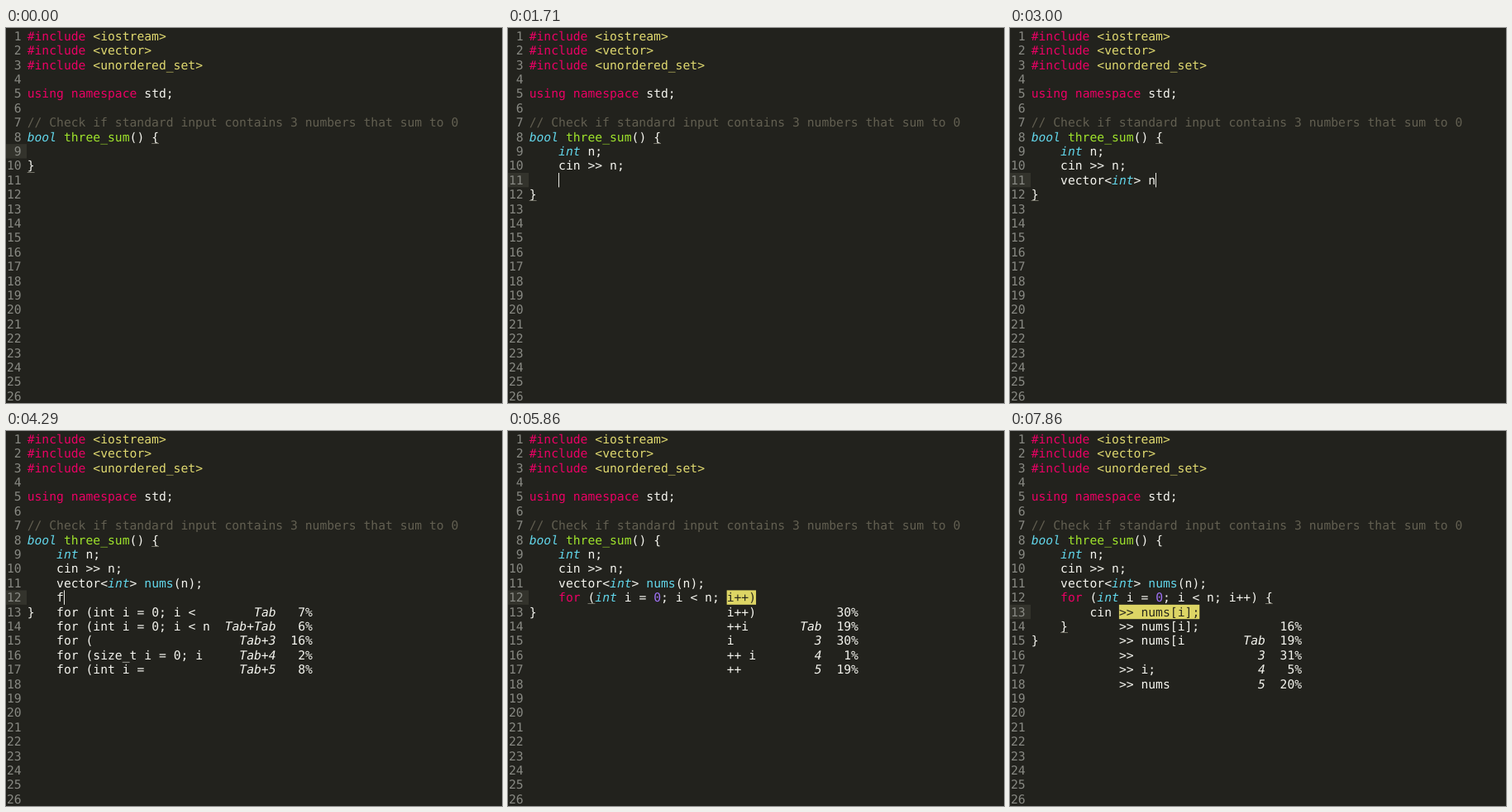
An HTML page for the animation above (8000 ms loop, 600 px wide and 453 px high).

```html
<!DOCTYPE html>
<html lang="en">
<head>
<meta charset="utf-8">
<title>Code completion</title>
<style>
  html, body { margin: 0; width: 100%; height: 100%; overflow: hidden; background: #22221d; }
  svg { display: block; width: 100%; height: 100%; }
  text { font: 14.7px "DejaVu Sans Mono", monospace; white-space: pre; text-rendering: geometricPrecision; fill: #f4f4ee; }
  .num { fill: #888983; }
  .pink { fill: #ea0064; }
  .yellow { fill: #e0d970; }
  .type { fill: #62d6ea; font-style: italic; }
  .call { fill: #62d6ea; }
  .def { fill: #9fe32c; }
  .digit { fill: #9f72f5; }
  .comment { fill: #625f51; }
  .dark { fill: #2b2a1e; }
  .key { font-style: italic; }
</style>
</head>
<body>
<svg viewBox="0 0 600 453"></svg>
<script>
const LOOP = 8000, CELL = 8.85, ROW = 17.4, LEFT = 25.7, TOP = 1, BASE = 13.8;
const svg = document.querySelector('svg');
const colX = col => LEFT + col * CELL;
const rowY = line => TOP + (line - 1) * ROW;

const HEADER = `#include <iostream>
#include <vector>
#include <unordered_set>

using namespace std;

// Check if standard input contains 3 numbers that sum to 0
bool three_sum() {`.split('\n');

const TOKENS = [
  ['comment', /\/\/.*/y],
  ['pink', /#include|\b(?:using|namespace|for)\b/y],
  ['yellow', /(?<=#include )<\w+>/y],
  ['type', /\b(?:int|bool)\b/y],
  ['def', /three_sum/y],
  ['call', /nums(?=\()/y],
  ['digit', /\b\d+/y],
  ['', /\w+|[^\w\s]+?/y]
];

// Completion lists: 'text:percent'
const VEC_LONG = ['vector<int>:24', 'vector<string> names;:4', 'vector<:21', 'vector<unsigned int>:3', 'vector<int> n:9'];
const VEC = ['vector<int>:31', 'vector<string>:5', 'vector<:18', 'vector<unsigned int>:3', 'vector<unsigned:4'];
const FOR = ['for (int i = 0; i <:7', 'for (int i = 0; i < n:6', 'for (:16', 'for (size_t i = 0; i:2', 'for (int i =:8'];
const FOR_LONG = ['for (int i = 0; i < n;:9', 'for (int i = 0; i <:8', 'for (:17', 'for (size_t i = 0; i:2', 'for (int i =:9'];
const STEP = ['i++):30', '++i:19', 'i:30', '++ i:1', '++:19'];
const OPEN = [' {:42', ' cin:9', ' nums:3', ' cin :8', ' if:2'];
const OPEN_NEXT = ['{:45', 'cin:10', 'cin >:9', 'nums:3', 'if:2'];
const CIN = ['cin >> nums[i];:15', 'cin >> nums[i:18', 'cin >>:30', 'cin >> i;:5', 'cin >> nums:20'];
const READ = ['>> nums[i];:16', '>> nums[i:19', '>>:31', '>> i;:5', '>> nums:20'];

const TAB = '    ';
const B1 = TAB + 'int n;\n';
const B2 = B1 + TAB + 'cin >> n;\n';
const B3 = B2 + TAB + 'vector<int> nums(n);\n';
const B4 = B3 + TAB + 'for (int i = 0; i < n; i++) {\n';
const END = '\n' + TAB + '}';

// Bracket underlines as [line, column]
const OUTER = [8, 17];
const whole = line => [OUTER, [line, 0]];
const PAREN = [[12, 8]];
const BLOCK = [[12, 32], [14, 4]];

// [time, body, marks, list, list column]; | caret, ¦ hidden caret, «» inserted completion
const steps = [[0, TAB + '¦', whole(10)]];
const type = (before, after, marks, items) => {
  for (const [time, text, list, col] of items) steps.push([time, before + TAB + text + after, marks, list, col]);
};
type('', '', whole(10), [[140, 'i|'], [290, 'in|'], [430, 'int|'], [570, 'int n|'], [710, 'int n;|']]);
type(B1, '', whole(11), [[860, '|'], [1000, 'c|'], [1140, 'cin|'], [1290, 'cin >>|'], [1430, 'cin >> |'], [1570, 'cin >> n;|']]);
type(B2, '', whole(12), [
  [1710, '|'], [1860, 'v|', VEC_LONG, 4], [2000, 've|', VEC_LONG, 4], [2140, 'vec|', VEC_LONG, 4],
  [2430, 'vect|', VEC, 4], [2570, '«vector<int>»', VEC, 4], [2710, 'vector<int>|'], [2860, 'vector<int> |'],
  [3000, 'vector<int> n|'], [3140, 'vector<int> nu|'], [3290, 'vector<int> nums|'],
  [3430, 'vector<int> nums(n|'], [3570, 'vector<int> nums(n)|'], [3710, 'vector<int> nums(n);|']
]);
type(B3, '', whole(13), [[3860, '|']]);
type(B3, '', [OUTER], [[4290, 'f|', FOR, 4], [4570, 'fo|', FOR_LONG, 4], [4710, 'for|', FOR_LONG, 4]]);
type(B3, '', PAREN, [
  [5000, '«for (int i = 0; i < n;»', FOR_LONG, 4], [5290, 'for (int i = 0; i < n;|'],
  [5570, 'for (int i = 0; i < n; |', STEP, 27], [5860, 'for (int i = 0; i < n; «i++)»', STEP, 27]
]);
type(B3, '', [OUTER], [
  [6000, 'for (int i = 0; i < n; i++)|', OPEN, 31], [6140, 'for (int i = 0; i < n; i++) |', OPEN_NEXT, 32],
  [6290, 'for (int i = 0; i < n; i++) {|}']
]);
type(B4 + TAB, END, BLOCK, [
  [6430, '|'], [6860, '¦'], [7000, 'c|', CIN, 8], [7140, 'cin|', CIN, 8],
  [7290, 'cin |', READ, 12], [7710, 'cin «>> nums[i];»', READ, 12]
]);

function add(tag, attrs, content = '') {
  const node = document.createElementNS('http://www.w3.org/2000/svg', tag);
  for (const name in attrs) node.setAttribute(name, attrs[name]);
  node.textContent = content;
  svg.append(node);
}
const box = (x, y, width, height, fill) => add('rect', { x, y, width, height, fill });
const put = (line, x, content, cls = '') => add('text', { x, y: rowY(line) + BASE, class: cls }, content);

function drawCode(line, source, from, to) {
  for (let at = 0; at < source.length;) {
    let size = 1;
    for (const [cls, pattern] of TOKENS) {
      pattern.lastIndex = at;
      const match = pattern.exec(source);
      if (!match) continue;
      size = match[0].length;
      put(line, colX(at), match[0], at >= from && at < to ? 'dark' : cls);
      break;
    }
    at += size;
  }
}

function drawList(line, col, list, held) {
  const rows = list.map(entry => entry.split(':'));
  const keys = held ? ['', 'Tab', '3', '4', '5'] : ['Tab', 'Tab+Tab', 'Tab+3', 'Tab+4', 'Tab+5'];
  const keyEnd = col + Math.max(...rows.map(row => row[0].length)) + 9;
  rows.forEach(([label, share], i) => {
    const y = line + 1 + i, percent = share + '%';
    for (const word of label.matchAll(/\S+/g)) put(y, colX(col + word.index), word[0]);
    put(y, colX(keyEnd - keys[i].length), keys[i], 'key');
    put(y, colX(keyEnd + 5 - percent.length), percent);
  });
}

function draw([, body, marks, list, col]) {
  svg.replaceChildren();
  const lines = [...HEADER, ...body.split('\n'), '}'];
  const active = lines.findIndex(text => /[|¦«]/.test(text)) + 1;
  const top = rowY(active);
  box(0, top, 25, ROW, '#33332c');
  for (let n = 1; n <= 26; n++) put(n, 1 + (n < 10 ? CELL : 0), String(n), 'num');

  lines.forEach((raw, i) => {
    const caret = raw.indexOf('|'), from = raw.indexOf('«');
    const to = from < 0 ? -1 : raw.indexOf('»') - 1;
    if (from >= 0) box(colX(from), top, (to - from) * CELL, ROW, '#ddd565');
    drawCode(i + 1, raw.replace(/[|¦«»]/g, ''), from, to);
    if (caret >= 0) box(Math.round(colX(caret)), top, 1, ROW, '#e8e8e2');
  });
  for (const [line, at] of marks) box(colX(at), Math.round(rowY(line) + 16), CELL, 1, '#77766a');
  if (list) drawList(active, col, list, body.includes('«'));
}

let shown;
const start = performance.now();
function tick() {
  const time = (performance.now() - start) % LOOP;
  const step = steps.findLast(item => item[0] <= time);
  if (step !== shown) draw(shown = step);
  requestAnimationFrame(tick);
}
tick();
</script>
</body>
</html>
```
